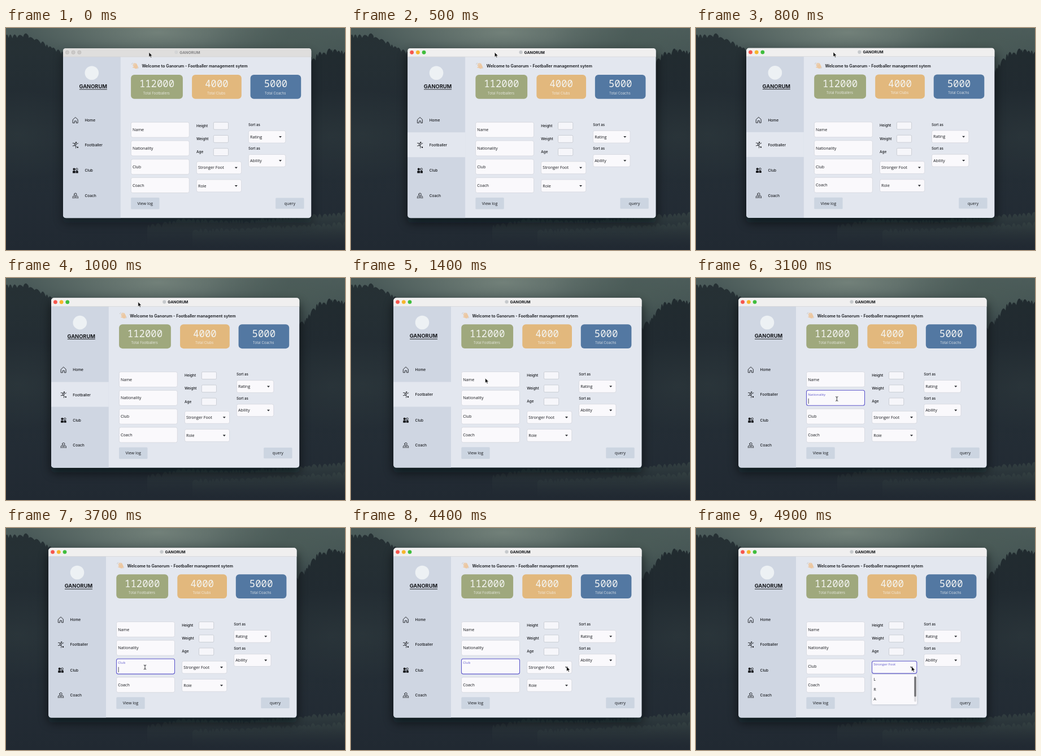
An HTML page that plays this animation: 600x394 px, repeating every 5000 ms.

```html
<!DOCTYPE html>
<html lang="en">
<head>
<meta charset="utf-8">
<title>Footballer management</title>
<style>
  html, body { margin: 0; width: 100%; height: 100%; overflow: hidden; background: #222b33; }
  svg { display: block; width: 100vw; height: 100vh; }
  text { font-family: Inter, Roboto, sans-serif; fill: #15171b; white-space: pre; }
  .form { font-family: "Open Sans", "Noto Sans", sans-serif; font-size: 7.2px; }
  .num { font-family: "Noto Sans Mono", "DejaVu Sans Mono", monospace; font-size: 17.3px; fill: #f3f4f2; }
  .cap { font-size: 6.2px; font-weight: 300; fill: #f5f5f3; }
  .mid { text-anchor: middle; }
  .line { fill: none; stroke: #1b1d22; stroke-width: .9; stroke-linecap: round; stroke-linejoin: round; }
</style>
</head>
<body>
<svg id="stage" viewBox="0 0 600 394" preserveAspectRatio="xMidYMid slice">
  <defs>
    <linearGradient id="sky" x1="0" y1="0" x2="0" y2="1">
      <stop offset="0" stop-color="#4c5c5a"/>
      <stop offset=".1" stop-color="#455555"/>
      <stop offset=".28" stop-color="#303c42"/>
      <stop offset=".55" stop-color="#252f37"/>
      <stop offset="1" stop-color="#212932"/>
    </linearGradient>
    <radialGradient id="mist">
      <stop offset="0" stop-color="#7f8d84" stop-opacity=".75"/>
      <stop offset="1" stop-color="#7f8d84" stop-opacity="0"/>
    </radialGradient>
    <radialGradient id="haze">
      <stop offset="0" stop-color="#4d5e58" stop-opacity=".6"/>
      <stop offset="1" stop-color="#4d5e58" stop-opacity="0"/>
    </radialGradient>
    <linearGradient id="wood" x1="0" y1="0" x2="0" y2="1">
      <stop offset="0" stop-color="#1d262b"/>
      <stop offset=".55" stop-color="#222b32"/>
      <stop offset="1" stop-color="#222b32" stop-opacity="0"/>
    </linearGradient>
    <linearGradient id="canopy" x1="0" y1="0" x2="0" y2="1">
      <stop offset="0" stop-color="#43534d"/>
      <stop offset="1" stop-color="#2a353a" stop-opacity="0"/>
    </linearGradient>
    <filter id="soft" x="-20%" y="-20%" width="140%" height="150%"><feGaussianBlur stdDeviation="9"/></filter>
    <filter id="edge" x="-20%" y="-20%" width="140%" height="150%"><feGaussianBlur stdDeviation="2"/></filter>
    <clipPath id="frame"><rect x="75.2" y="35.2" width="439.3" height="301.4" rx="5"/></clipPath>
  </defs>
  <g id="forest"></g>
  <g id="win"></g>
  <g id="pointer">
    <path id="arrow" d="M0 0V8.2L1.9 6.5L3.2 9.4L4.6 8.8L3.3 6H5.9Z" fill="#090909" stroke="#f4f4f4" stroke-width=".6"/>
    <path id="beam" class="line" d="M-1.8-3.8Q0-3.8 0-2.6Q0-3.8 1.8-3.8M0-2.8V2.8M-1.8 3.8Q0 3.8 0 2.6Q0 3.8 1.8 3.8"/>
  </g>
</svg>
<script>
const LOOP = 5000, STEP = 100, NEVER = 1e9;
const INK = '#15171b', INDIGO = '#5f59cb', MAIN = '#e3e7ef', SIDE = '#cfd6e2', PAPER = '#faf9fc';
const $ = id => document.getElementById(id);
const win = $('win'), forest = $('forest');

function add(parent, tag, attrs, text) {
  const el = document.createElementNS('http://www.w3.org/2000/svg', tag);
  set(el, attrs);
  if (text) el.textContent = text;
  parent.appendChild(el);
  return el;
}
function set(el, attrs) {
  for (const k in attrs) el.setAttribute(k, attrs[k]);
}
const rect = (p, x, y, width, height, fill, more) => add(p, 'rect', { x, y, width, height, fill, ...more });
const label = (p, x, y, text, more) => add(p, 'text', { x, y, ...more }, text);
const group = p => add(p, 'g', {});
const ramp = (t, a, b) => Math.max(0, Math.min(1, (t - a) / (b - a)));
const ease = u => u * u * (3 - 2 * u);
const show = (el, on) => el.setAttribute('visibility', on ? 'visible' : 'hidden');

// Misty woodland backdrop
let seed = 7;
const rand = () => (seed = seed * 16807 % 2147483647) / 2147483647;

function trees(ridge, foot, opacity, paint = 'wood') {
  let d = `M${ridge[0][0]} ${foot}V${ridge[0][1]}`;
  for (let i = 1; i < ridge.length; i++) {
    const [x0, y0] = ridge[i - 1], [x1, y1] = ridge[i];
    for (let x = x0; x < x1;) {
      const w = Math.min(x1 - x, 4 + rand() * 8);
      const y = y0 + (y1 - y0) * (x + w - x0) / (x1 - x0);
      d += `Q${x + w * .4} ${y - 5 - rand() * 7} ${x + w} ${y + rand() * 4}`;
      x += w;
    }
  }
  d += `V${foot}Z`;
  add(forest, 'path', { d, fill: `url(#${paint})`, opacity });
}
const cloud = (cx, cy, rx, ry, id) => add(forest, 'ellipse', { cx, cy, rx, ry, fill: `url(#${id})` });

rect(forest, 0, 0, 600, 394, 'url(#sky)');
cloud(270, 8, 230, 62, 'mist');
cloud(500, 30, 150, 60, 'haze');
trees([[-5, 16], [40, 14], [75, 32], [105, 46], [140, 84]], 300, .8);
trees([[440, 150], [490, 108], [530, 78], [552, 50], [578, 40], [605, 46]], 300, .9);
trees([[250, 356], [310, 342], [420, 345], [605, 330]], 386, .5, 'canopy');
trees([[330, 362], [450, 356], [605, 348]], 392, .35, 'canopy');
cloud(20, 190, 130, 80, 'haze').setAttribute('opacity', .25);
cloud(580, 190, 110, 80, 'haze').setAttribute('opacity', .25);

// Window
const shade = rect(win, 75, 43, 440, 302, '#05080b', { rx: 6, filter: 'url(#soft)' });
const body = add(win, 'g', { 'clip-path': 'url(#frame)' });
rect(body, 75, 35, 440, 302, MAIN);
rect(body, 75, 50, 102, 287, SIDE);
const picked = rect(body, 75, 184.5, 102, 44, MAIN);
const bar = rect(body, 75, 35, 440, 15.5, '#f0efef');
rect(body, 75, 50.1, 440, .5, '#c9c9cb');
const lights = ['#f6564d', '#f6b52b', '#3fbd3c'].map((hue, i) =>
  ({ hue, el: add(body, 'circle', { cx: 82.6 + i * 10.7, cy: 42.6, r: 3.2, 'stroke-width': .5 }) }));
const heading = group(body);
add(heading, 'circle', { cx: 275.5, cy: 42.3, r: 3.1, fill: '#c6c9cc' });
label(heading, 299.6, 44.9, 'GANORUM', { class: 'mid', 'font-size': 6.8, 'font-weight': 700 });

// Sidebar
add(body, 'circle', { cx: 126, cy: 79, r: 12.3, fill: '#edf1f4' });
label(body, 128.4, 106.4, 'GANORUM', { class: 'mid', 'font-size': 9.3, 'font-weight': 700 });
rect(body, 104, 107.8, 49, .9, INK);

[['Home', 165.3], ['Footballer', 209.4], ['Club', 254.8], ['Coach', 299.2]].forEach(([name, y]) =>
  label(body, 113.6, y, name, { 'font-size': 6.6, 'font-weight': 500 }));

function icon(y, lines, solid = '') {
  const g = add(body, 'g', { transform: `translate(97 ${y})` });
  add(g, 'path', { class: 'line', d: lines });
  add(g, 'path', { d: solid, fill: INK });
}
const dot = (x, y, r) => `M${x - r} ${y}a${r} ${r} 0 1 0 ${2 * r} 0a${r} ${r} 0 1 0 ${-2 * r} 0Z`;
icon(162.8, 'M-4.3-1L0-5L4.3-1V5H1.5V1.5H-1.5V5H-4.3Z');
icon(207, 'M-4.6-3.4L-1.4-3L1.4-1.4L4.8-3.2M-1.2-2.8L-1.8.8L1.4 2.2L.6 5.4M-2 1L-4.6 1.6M1-1.4L.2 1.6', dot(1.2, -4.4, 1.2) + dot(4, 4, 1.2));
icon(252.3, dot(2.5, -2.4, 1.8), dot(-2.3, -2.4, 2.1) + 'M-4.8 4.4V1.6Q-4.8.3-3.4.3H-1Q.1.3.1 1.6V4.4ZM.8 4.4V.3H3.6Q4.9.3 4.9 1.6V4.4Z');
icon(297, dot(0, -2.4, 2.2) + 'M-4.6 4.4V1.8Q-4.4.4-2.6.3L0 2.4L2.6.3Q4.4.4 4.6 1.8V4.4M-2.4 4.4V2.8M2.4 4.4V2.8M0 2.4V4.4');

// Greeting
const hand = add(body, 'g', { transform: 'translate(203 66.5) rotate(-32)', stroke: '#ecc8a2', 'stroke-width': 1.5, 'stroke-linecap': 'round' });
add(hand, 'path', { d: 'M-2.4 0V-3.4M-.5 0V-4.8M1.4 0V-4.4M3.1 .4V-2.8M-2.6 2.4L-4.8 0' });
add(hand, 'ellipse', { cx: .3, cy: 2, rx: 2.6, ry: 2.8, fill: '#ecc8a2' });
add(body, 'path', { class: 'line', d: 'M196.6 63.5Q197 62 198.4 61.4M207.4 71.4Q208.4 70.6 208.6 69.4', style: 'stroke:#b9b4ae;stroke-width:.6' });
label(body, 214.6, 69.6, 'Welcome to Ganorum - Footballer management sytem', { 'font-size': 7.2, 'font-weight': 600 });

// Totals
[[195.3, 91.8, '#9fa87d', '112000', 'Footballers'],
 [303.3, 87.7, '#e2b87d', '4000', 'Clubs'],
 [406.8, 89.6, '#5378a2', '5000', 'Coachs']].forEach(([x, w, hue, total, name]) => {
  rect(body, x, 82.2, w, 42.8, hue, { rx: 6 });
  label(body, x + w / 2, 104.6, total, { class: 'num mid' });
  label(body, x + w / 2 - .8, 117, 'Total ' + name, { class: 'cap mid' });
});

// Form controls: each control keeps its focus span in ms
function control(name, x, y, w, h, lift, from = NEVER, to = NEVER) {
  const box = rect(body, x, y, w, h, PAPER, { rx: 3 });
  const base = y + h / 2 + 2.6;
  const tag = label(body, x + 2.7, base, name, { class: 'form' });
  return { box, tag, base, lift, from, to };
}
function field(name, y, from, to) {
  const c = control(name, 195.5, y, 103, 26.9, 6.8, from, to);
  c.caret = rect(body, 198.7, y + 14.5, .8, 9.4, '#22242a');
  return c;
}
function combo(name, x, y, w, from, to) {
  const c = control(name, x, y, w, 21.8, 5.4, from, to);
  const ax = x + w - 9.3, ay = y + 9.8;
  add(body, 'path', { d: `M${ax - 2.5} ${ay}H${ax + 2.5}L${ax} ${ay + 2.8}Z`, fill: '#26282d' });
  return c;
}
const controls = [
  field('Name', 166.5, 2000, 2800),
  field('Nationality', 199.3, 2800, 3600),
  field('Club', 232.2, 3600, 4800),
  field('Coach', 264.9),
  combo('Stronger Foot', 311.5, 236.3, 79.3, 4800),
  combo('Role', 311.5, 268.4, 79.3),
  combo('Rating', 403.5, 181.5, 65.5),
  combo('Ability', 403.5, 223.8, 65.5)
];
['Height', 'Weight', 'Age'].forEach((name, i) => {
  const y = 166.6 + i * 23.2;
  label(body, 311.2, y + 8.4, name, { 'font-size': 6.4, 'font-weight': 500 });
  rect(body, 341.5, y, 26.2, 12.8, '#f6f6fa', { rx: 1.8, stroke: '#c3c7cf', 'stroke-width': .8 });
});
[173.3, 215.7].forEach(y => label(body, 403.2, y, 'Sort as', { 'font-size': 6.2, 'font-weight': 500 }));
[['View log', 195.3, 300.3, 20.6], ['query', 451.3, 300.8, 19.3]].forEach(([name, x, y, h]) => {
  rect(body, x, y, 50.4, h, '#ccd5e1', { rx: 1.5 });
  label(body, x + 25.2, y + h / 2 + 2.7, name, { class: 'form mid' });
});

// Drop-down list
const list = group(body);
rect(list, 311.5, 261, 79.5, 52, '#59606c', { filter: 'url(#edge)', opacity: .3 });
rect(list, 311.3, 260, 79.8, 53, PAPER, { rx: 2 });
['L', 'R', 'A'].forEach((name, i) => label(list, 314.2, 271.3 + i * 17.2, name, { class: 'form' }));
rect(list, 386.2, 263.5, 3.6, 45, '#dcdce0', { rx: 1.8 });
rect(list, 386.2, 263.5, 3.6, 36, '#77777a', { rx: 1.8 });

// Pointer stops: time, x, y
const stops = [
  [0, 253, 43.2], [420, 255, 43.2], [1220, 229, 42.4], [1400, 237.6, 178],
  [1600, 250, 184.5], [2300, 250, 184.5], [2700, 249.3, 214.5], [3200, 249.3, 214.5],
  [3500, 246, 247], [3750, 246, 247], [4300, 381.7, 246], [5000, 381.7, 246]
];

// Turns from 0 to 1 over two steps, starting halfway
const flip = (t, at) => t < at ? 0 : ramp(t, at - STEP, at + STEP);

function drawControl(c, t) {
  const u = flip(t, c.from) - flip(t, c.to);
  const on = t >= c.from && t < c.to;
  set(c.box, { stroke: on ? INDIGO : '#d3d6dd', 'stroke-width': on ? 1.1 : .8 });
  c.tag.setAttribute('y', c.base - c.lift * u);
  c.tag.style.fontSize = 7.2 - 1.05 * u + 'px';
  c.tag.style.fill = on ? INDIGO : INK;
  if (c.caret) show(c.caret, on && (t - c.from) % 1000 < 500);
}

function draw(t) {
  const left = 1 - ease(ramp(t, 420, 1220));
  win.setAttribute('transform', `translate(${25.8 * left} ${.7 * left})`);

  const active = t >= 200;
  shade.setAttribute('opacity', active ? .6 : .4);
  bar.setAttribute('fill', active ? '#f0efef' : '#dfdedd');
  heading.setAttribute('opacity', active ? 1 : .45);
  lights.forEach(({ hue, el }) => set(el, { fill: active ? hue : '#cbc9c8', stroke: active ? hue : '#b2b0af' }));
  show(picked, active && t < 2000);

  controls.forEach(c => drawControl(c, t));
  show(list, t >= 4900);

  let i = 1;
  while (stops[i][0] < t) i++;
  const [t0, x0, y0] = stops[i - 1], [t1, x1, y1] = stops[i];
  const u = ease(ramp(t, t0, t1));
  const x = x0 + (x1 - x0) * u, y = y0 + (y1 - y0) * u;
  $('pointer').setAttribute('transform', `translate(${x} ${y})`);
  const typing = t >= 1500 && x < 299;
  show($('beam'), typing);
  show($('arrow'), !typing);
}

const start = performance.now();
function tick() {
  const t = (performance.now() - start) % LOOP;
  draw(Math.floor(t / STEP) * STEP);
  requestAnimationFrame(tick);
}
draw(0);
requestAnimationFrame(tick);
</script>
</body>
</html>
```
